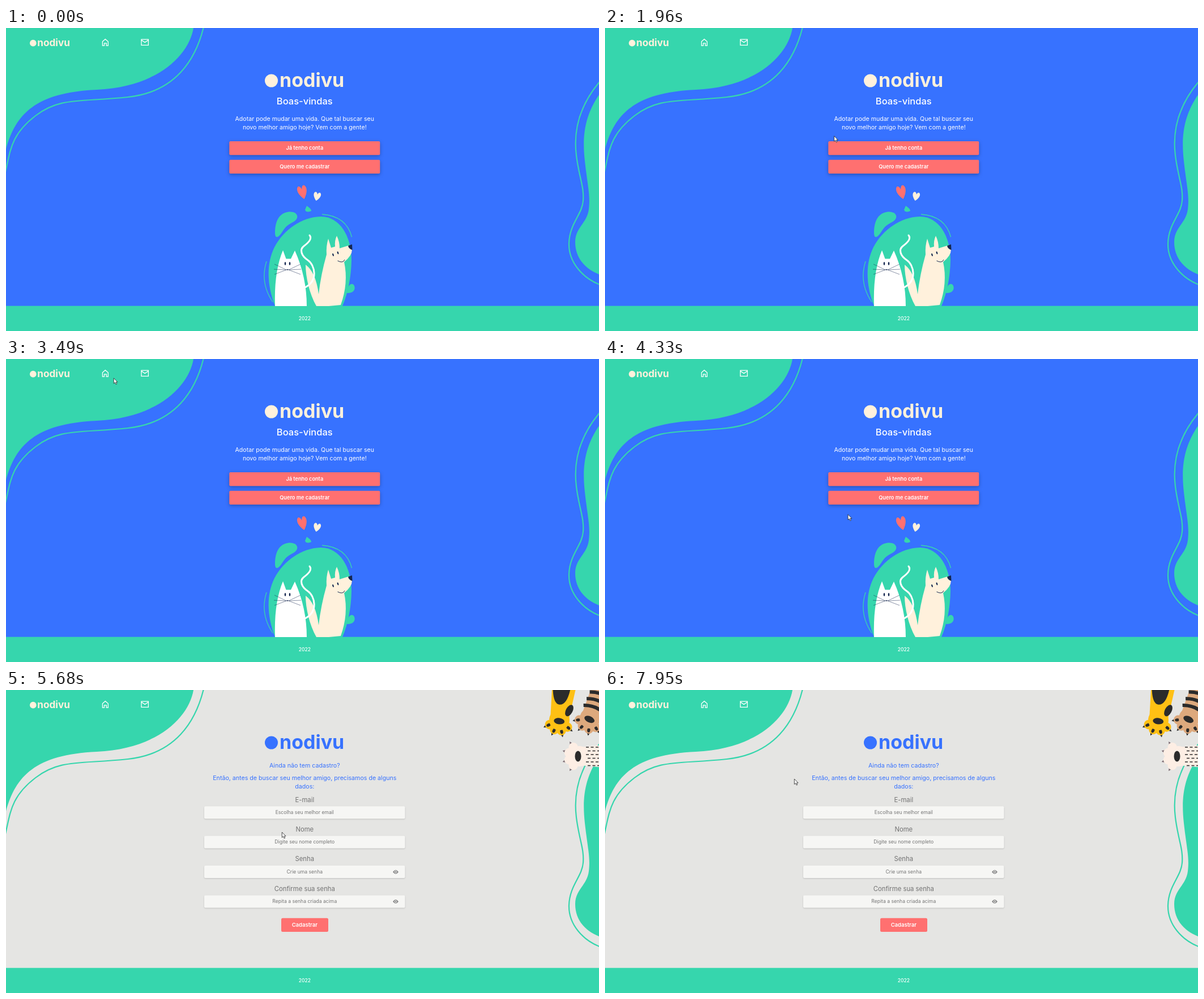
An HTML page for the animation above (8000 ms loop, 1047 by 535 pixels).

```html
<!DOCTYPE html>
<html lang="pt">
<head>
<meta charset="utf-8">
<title>Boas-vindas</title>
<style>
  html, body { margin: 0; width: 100%; height: 100%; overflow: hidden; background: #3772ff; }
  svg { display: block; width: 100%; height: 100%; font-family: Inter, Roboto, sans-serif; }
  .mid text { text-anchor: middle; }
  .green { fill: #36d6ad; }
  .line { fill: none; stroke: #36d6ad; }
  .cream { fill: #fff1dc; }
  .navy { fill: #14264f; }
  .coral { fill: #ff7070; }
  .raised { filter: drop-shadow(0 2px 3px rgba(0, 0, 0, .28)); }
  .bold { font-weight: 600; font-size: 9.2px; fill: #fff; }
  .label { font-size: 11.3px; fill: #737373; }
  .hint { font-size: 8.6px; fill: #757575; }
  .field { fill: #f6f6f4; filter: drop-shadow(0 1px 1px rgba(0, 0, 0, .16)); }
  .logo { font-weight: 700; font-size: 34px; }
  #form, #cursor { display: none; }
</style>
</head>
<body>
<svg viewBox="0 0 1047 535" preserveAspectRatio="none">
  <defs>
    <g id="logo" class="logo">
      <circle cx="468.5" cy="93" r="11.5"/>
      <text x="483" y="104">nodivu</text>
    </g>
    <g id="eye">
      <path d="M-5 0Q0-7 5 0Q0 7-5 0Z" fill="#858585"/>
      <circle r="1.8" fill="none" stroke="#f6f6f4"/>
    </g>
    <path id="heart" d="M0 0C-9-7-12-14-8-18C-5-21-1-18 0-14C1-18 5-21 8-18C12-14 9-7 0 0Z"/>
  </defs>

  <rect id="back" width="1047" height="535" fill="#3772ff"/>

  <g class="green">
    <path d="M0 0H331C323 48 268 104 160 109S17 152 0 214Z"/>
    <path d="M1047 118C1022 155 1017 190 1022 235S1032 295 1029 320S1005 352 1005 378S1020 424 1047 435Z"/>
    <rect y="490.7" width="1047" height="45"/>
  </g>
  <g class="line" stroke-width="2.2">
    <path d="M349-2C335 55 300 113 215 122S95 122 52 155S8 215-1 254"/>
    <path d="M1048 95C1010 140 1002 185 1007 225S1021 280 1019 305S995 345 994 380S1020 442 1048 453"/>
  </g>

  <use href="#logo" class="cream" transform="translate(-189.7 -20.5) scale(.507)"/>
  <g fill="none" stroke="#fff" stroke-width="1.3">
    <path d="M170.4 24L175.3 19.7 180.3 24V31.2H177.2V26.8H173.5V31.2H170.4Z"/>
    <path d="M239 20.2H251.4V30.3H239ZM239 21.2L245.2 25.4 251.4 21.2"/>
  </g>
  <text x="527.3" y="516.2" text-anchor="middle" font-size="8.5" font-weight="500" fill="#fff">2022</text>

  <g id="home">
    <use href="#logo" class="cream"/>
    <g class="mid" fill="#fff">
      <text x="527.3" y="135.3" font-size="16.5" font-weight="500">Boas-vindas</text>
      <g font-size="10.6">
        <text x="527.3" y="164">Adotar pode mudar uma vida. Que tal buscar seu</text>
        <text x="527.3" y="179">novo melhor amigo hoje? Vem com a gente!</text>
      </g>
      <g id="buttons"></g>
    </g>

    <use href="#heart" class="coral" transform="translate(526.5 302) rotate(-14) scale(.85 1.25)"/>
    <use href="#heart" class="cream" transform="translate(547.5 305) rotate(12) scale(.65 .8)"/>

    <g class="green">
      <path d="M475 491C461 455 459 417 474 387S522 334 555 333S610 366 610 410Q609 455 594 491Z"/>
      <path d="M475 362C475 345 480 328 497 325S520 335 508 342S495 349 487 361S475 370 475 362Z"/>
      <path d="M531 314Q539 319 539 323Q530 327 528 321Z"/>
      <path d="M602 468C602 460 605 452 611 452S620 469 602 468Z"/>
    </g>
    <path class="line" stroke-width="1.3" d="M558 329Q601 332 610.5 369M460 412Q448 450 471 484"/>

    <path class="cream" d="M548 491C536 470 529 440 529 418Q547 431 552 470Q556 435 566 400Q565 385 569 372L574 388 581 386Q580 375 584 367Q589 377 589 389L605 384 611 391Q611 402 597 413Q605 450 591 489L570 491Z"/>
    <path class="navy" d="M604 384.500L611 382 611.500 392Q605 390 604 384.500Z"/>
    <path d="M585.500 411Q595 416 598 409" fill="none" stroke="#14264f"/>
    <path d="M536 366C541 372 534 379 526 385S521 402 533 410S553 447 526 459" fill="none" stroke="#fff" stroke-width="3" stroke-linecap="round"/>
    <path d="M475 491Q473 430 489 392.500L494.500 407.500H503L510 393Q531 440 531 491Z" fill="#fff"/>
    <path class="navy" d="M495 426H499L497 428Z"/>
    <g id="face" class="navy"></g>
  </g>

  <g id="form">
    <use href="#logo" fill="#3772ff"/>
    <g class="mid">
      <g fill="#3772ff" font-size="10.65">
        <text x="527.3" y="137">Ainda não tem cadastro?</text>
        <text x="527.3" y="159.3">Então, antes de buscar seu melhor amigo, precisamos de alguns</text>
        <text x="527.3" y="174.3">dados:</text>
      </g>
      <g id="fields"></g>
      <rect class="coral" x="486" y="402.700" width="83" height="24.300" rx="2.500"/>
      <text class="bold" x="527.3" y="417.8" style="font-size:9.5px">Cadastrar</text>
    </g>
    <g id="paws"></g>
  </g>

  <g id="cursor" stroke-linejoin="round" stroke-width=".8" stroke="#222" fill="#fff">
    <path id="arrow" d="M0 0V9.500L2.200 7.500 3.800 11 5.400 10.300 3.900 7H6.800Z"/>
    <path id="hand" d="M-1.200 1Q0-1 1 1V4L4.500 4.800Q6 5.300 5.600 7L4.800 11H-.8L-3.800 7.300Q-3.500 5.800-1.200 7.200Z"/>
    <path id="beam" d="M-2-5H2M0-5V5M-2 5H2" fill="none"/>
  </g>
</svg>
<script>
const LOOP = 8000, TICK = 70, SWITCH = 5680, APPEAR = 390;
const FIELD_TOP = 205.2, FIELD_GAP = 52.4, FIELD_H = 22;
const $ = id => document.getElementById(id);
const show = (id, on) => { $(id).style.display = on ? 'inline' : 'none'; };
const repeat = (n, fn) => Array.from({ length: n }, (_, i) => fn(i)).join('');
const oval = (x, y, rx, ry, turn = 0) =>
  `<ellipse cx="${x}" cy="${y}" rx="${rx}" ry="${ry}" transform="rotate(${turn} ${x} ${y})"/>`;

$('buttons').innerHTML = ['Já tenho conta', 'Quero me cadastrar'].map((label, i) => {
  const y = 200 + i * 32.8;
  return `<rect class="coral raised" x="394.3" y="${y}" width="266" height="24.3" rx="2"/>
    <text class="bold" x="527.3" y="${y + 15.2}">${label}</text>`;
}).join('');

$('fields').innerHTML = [
  ['E-mail', 'Escolha seu melhor email'],
  ['Nome', 'Digite seu nome completo'],
  ['Senha', 'Crie uma senha'],
  ['Confirme sua senha', 'Repita a senha criada acima']
].map(([label, hint], i) => {
  const y = FIELD_TOP + i * FIELD_GAP;
  return `<text class="label" x="527.3" y="${y - 7.7}">${label}</text>
    <rect class="field" x="350" y="${y}" width="354.5" height="${FIELD_H}" rx="2"/>
    <text class="hint" x="527.3" y="${y + 13.8}">${hint}</text>` +
    (i > 1 ? `<use href="#eye" x="688" y="${y + 11.2}"/>` : '');
}).join('');

// eyes of both pets, then three whiskers on each side
$('face').innerHTML =
  oval(493, 416, 1.3, 3) + oval(501, 416, 1.3, 3) +
  oval(577.5, 400.5, 1.2, 2.5, -18) + oval(586, 397, 1.2, 2.5, -18) +
  repeat(6, i => {
    const side = i % 2 ? 1 : -1, row = (i >> 1) - 1;
    return `<path d="M${497 + side * 2} 427l${side * (22 - row * row)} ${row * 9 - 1}" stroke="#14264f" stroke-width=".5"/>`;
  });

// a paw reaching down from its arm: pad at the origin, four toes fanned below
function paw(x, y, turn, fur, claw, marks, toePads = true) {
  const toes = repeat(4, i => `<g transform="rotate(${(i - 1.5) * 38})">
    <path d="M-3 25L0 31 3 25Z" fill="${claw}"/>
    <circle cy="19" r="8.2"/>
    ${toePads ? `<ellipse cy="21" rx="2.6" ry="4" fill="#2b2b2b"/>` : ''}</g>`);
  return `<g transform="translate(${x} ${y}) rotate(${turn})" fill="${fur}">
    <path d="M-16 0L-22-70H22L16 0Z"/>${toes}<circle r="18"/>
    <g fill="#2b2b2b" stroke="#2b2b2b" stroke-width="0">${marks}</g></g>`;
}
const pad = oval(0, 2, 9.5, 5.5);
const spots = '<path d="M-20-60H12Q10-27-4-27Q-16-27-20-60Z"/>' + oval(15, -19, 6, 11, 20);
const stripes = repeat(4, i => `<path d="M-20 ${-16 - i * 13}Q0 ${-26 - i * 13} 20 ${-18 - i * 13}" fill="none" stroke-width="6"/>`);
const dashes = repeat(6, i => `<path d="M${i * 6.5 - 16} ${-12 - i % 2 * 3}V-50" stroke-width="1.3" stroke-dasharray="5 3.5"/>`);
$('paws').innerHTML =
  paw(1031, 50, 25, '#dda97d', '#2b2b2b', stripes + pad) +
  paw(977, 53, 8, '#ffc014', '#2b2b2b', spots + pad) +
  paw(1012, 117, 90, '#fdeee4', '#77666e', dashes + pad, false);

// pointer moves: start, end, x, y; it rests in between
const start = [978, 517];
const moves = [
  [390, 1210, 506, 326],
  [1210, 1620, 473, 242],
  [1750, 2520, 222, 54],
  [2520, 2730, 240, 36.5],
  [2730, 3630, 176, 33],
  [3760, 4330, 429, 274.5],
  [4330, 4740, 487.3, 251],
  [6070, 6490, 525, 226],
  [6620, 6830, 528, 220],
  [7030, 7810, 470, 322],
  [7810, 7950, 334.3, 157]
];

function pointAt(t) {
  let [x, y] = start;
  for (const [from, to, toX, toY] of moves) {
    if (t < from) break;
    const held = Math.floor((t - from) / TICK) * TICK;
    const k = t >= to ? 1 : held / (to - from);
    x += (toX - x) * k;
    y += (toY - y) * k;
  }
  return [x, y];
}

function kindAt(x, y, form) {
  if (form) {
    const inField = x > 350 && x < 704 && y > FIELD_TOP && y < 385 && (y - FIELD_TOP) % FIELD_GAP < FIELD_H;
    return inField ? 'beam' : 'arrow';
  }
  const nearIcon = [175, 245].some(icon => Math.abs(x - icon) < 11);
  return y < 40 && nearIcon ? 'hand' : 'arrow';
}

function draw() {
  const t = performance.now() % LOOP, form = t >= SWITCH;
  const [x, y] = pointAt(t), kind = kindAt(x, y, form);
  show('home', !form);
  show('form', form);
  $('back').setAttribute('fill', form ? '#e5e5e3' : '#3772ff');
  show('cursor', t >= APPEAR);
  $('cursor').setAttribute('transform', `translate(${x} ${y})`);
  for (const id of ['arrow', 'hand', 'beam']) show(id, id === kind);
  requestAnimationFrame(draw);
}
draw();
</script>
</body>
</html>
```
